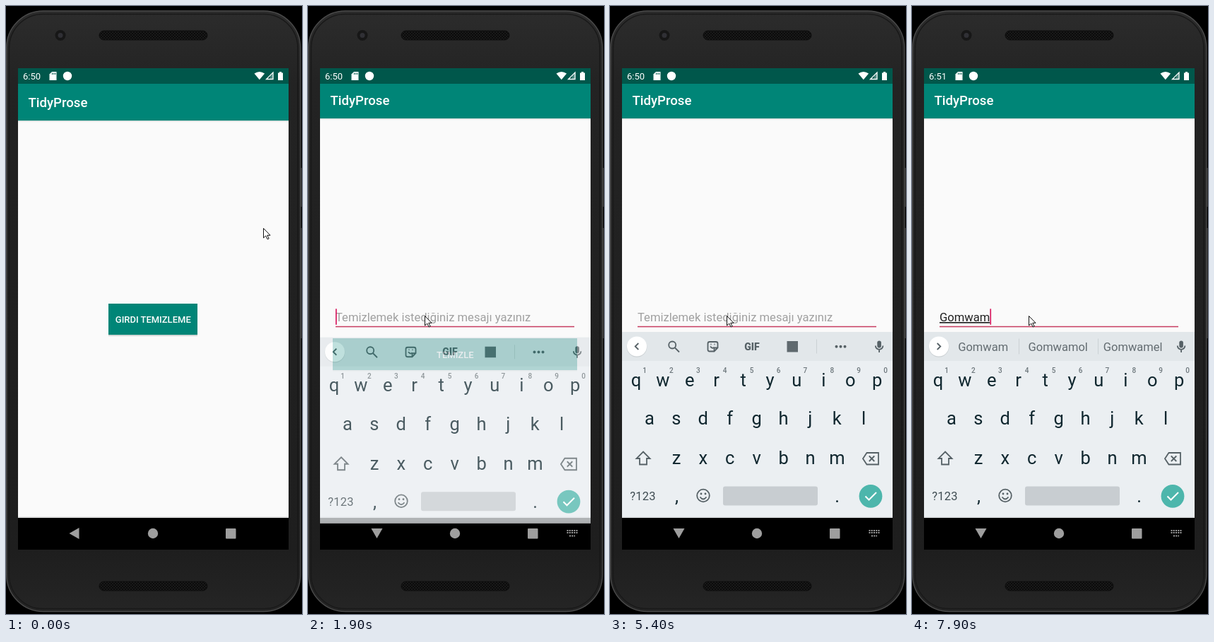
Animation of 419 by 860 pixels, one loop 8000 ms. Source, as an HTML page:

```html
<!DOCTYPE html>
<html lang="tr">
<head>
<meta charset="utf-8">
<title>Phone input demo</title>
<style>
  html, body { margin: 0; width: 100%; height: 100%; overflow: hidden; background: #000; }
  svg { display: block; width: 419px; height: 860px; font-family: Roboto, sans-serif; }
  .mid { text-anchor: middle; }
  .title { font-size: 18.6px; font-weight: 500; fill: #fff; }
  .button { font-size: 13px; font-weight: 500; fill: #fff; text-anchor: middle; }
  .input { font-size: 16.6px; }
  .key { font-size: 25.5px; fill: #10272f; }
  .digit { font-size: 10px; font-weight: 500; fill: #6d777c; }
  .word { font-size: 16.5px; fill: #636c71; }
  .line { fill: none; stroke: #566166; stroke-width: 1.8; }
</style>
</head>
<body>
<svg viewBox="0 0 419 860">
  <defs>
    <linearGradient id="body" x1="0" y1="0" x2="0" y2="1">
      <stop offset="0" stop-color="#2c2c2c"/>
      <stop offset=".12" stop-color="#232323"/>
      <stop offset=".9" stop-color="#1e1e1e"/>
      <stop offset="1" stop-color="#252525"/>
    </linearGradient>
    <pattern id="mesh" width="4" height="4" patternUnits="userSpaceOnUse">
      <rect width="4" height="4" fill="#191919"/>
      <circle cx="1" cy="1" r="1" fill="#060606"/>
      <circle cx="3" cy="3" r="1" fill="#060606"/>
    </pattern>
    <clipPath id="screen"><rect x="17" y="88" width="383" height="681"/></clipPath>
    <g id="bar">
      <rect x="17" y="108" width="383" height="54" fill="#008577"/>
      <rect x="17" y="162" width="383" height="1.5" fill="#dcdfde"/>
      <text class="title" x="31.5" y="143">TidyProse</text>
    </g>
    <g id="edges">
      <rect x="17" y="88" width="383" height="22" fill="#00574b"/>
      <rect x="17" y="722" width="383" height="2" fill="#e2e2e2"/>
      <rect x="17" y="724" width="383" height="45"/>
    </g>
  </defs>

  <!-- Phone -->
  <path d="M416 229h3v55h-3zM416 314h3v156h-3z" fill="#2b2b2b"/>
  <rect x=".8" y="7" width="416" height="849.5" rx="52" fill="url(#body)" stroke="#4b4b4b" stroke-width="1.4"/>
  <rect x="4.5" y="11.5" width="408.5" height="841" rx="48" fill="none" stroke="#191919" stroke-width="1.5"/>
  <circle cx="77" cy="41.5" r="7.5" fill="#171717"/>
  <circle cx="77" cy="41.5" r="3.5" fill="#303035"/>
  <rect x="132" y="35" width="153" height="13" rx="6.5" fill="url(#mesh)" stroke="#0e0e0e"/>
  <rect x="132" y="814" width="153" height="13" rx="6.5" fill="url(#mesh)" stroke="#0e0e0e"/>

  <g clip-path="url(#screen)">
    <rect x="17" y="88" width="383" height="681"/>
    <g id="home">
      <rect x="17" y="88" width="383" height="681" fill="#fafafa"/>
      <use href="#bar"/>
      <rect x="145" y="422" width="126" height="45" fill="#d3d7d6"/>
      <rect x="145" y="421" width="126" height="44" fill="#008577"/>
      <text class="button" x="208.3" y="447.7">GIRDI TEMIZLEME</text>
      <use href="#edges"/>
      <rect id="shade" x="17" y="88" width="383" height="681" opacity=".07"/>
    </g>

    <g id="form">
      <rect x="17" y="88" width="383" height="681" fill="#fafafa"/>
      <g id="pan">
        <use href="#bar"/>
        <text id="hint" class="input" x="39" y="449" fill="#a0a0a0">Temizlemek istediğiniz mesajı yazınız</text>
        <text id="typed" class="input" x="39" y="449" fill="#212121" text-decoration="underline"></text>
        <rect id="underline" x="39" width="338"/>
        <rect id="caret" y="431.3" width="1.7" height="22.5" fill="#d81b60"/>
        <rect x="35" y="474" width="346" height="45.5" fill="#d3d7d6"/>
        <rect x="35" y="473" width="346" height="45" fill="#008577"/>
        <text class="button" x="208.3" y="500.5">TEMIZLE</text>
      </g>
      <use href="#edges"/>
    </g>

    <g id="keyboard">
      <rect x="17" y="461" width="383" height="263" fill="#ebeff2"/>
      <rect x="17" y="461" width="383" height="41" fill="#e2e7ea"/>
      <rect x="17" y="722" width="383" height="2" fill="#dfe2e4"/>
      <circle cx="38" cy="482.5" r="14.3" fill="#cdd2d5"/>
      <circle cx="38" cy="481.5" r="14" fill="#fff"/>
      <path id="chevron" d="M2.3-4.5-2.3 0l4.6 4.5" class="line"/>
      <g id="tools">
        <circle cx="88.2" cy="479.5" r="5" class="line"/>
        <path d="M92 483.5l6 6" class="line" stroke-width="2"/>
        <path d="M141 475h9q2.500 0 2.500 2.500v6l-5 5h-6.500q-2.500 0-2.500-2.500v-8.500q0-2.500 2.500-2.500zM152 483.500h-4.500v5M142 481.500q3 4 5.500 1M142.500 478.500h1M147.500 478.500h1" class="line"/>
        <text class="mid" x="201" y="486.600" font-size="14" font-weight="900" fill="#566166">GIF</text>
        <rect x="250.500" y="474" width="15.500" height="15.500" fill="#5f696e"/>
        <path d="M292.500 471.500v20" stroke="#cbd1d4"/>
        <g fill="#566166">
          <circle cx="320.500" cy="481.700" r="2"/><circle cx="326.500" cy="481.700" r="2"/><circle cx="332.500" cy="481.700" r="2"/>
        </g>
      </g>
      <g id="words">
        <path d="M151.500 470.500v22M263.500 470.500v22" stroke="#cbd1d4"/>
        <text class="word mid" x="100.700" y="488"></text>
        <text class="word mid" x="206.700" y="488"></text>
        <text class="word mid" x="312.700" y="488"></text>
      </g>
      <rect x="378.300" y="473.500" width="5.600" height="10" rx="2.800" fill="#566166"/>
      <path d="M375.800 480.500a5.300 5.300 0 0 0 10.600 0M381.100 486v4" class="line" stroke-width="1.600"/>
      <g id="keys"></g>
      <path d="M47 630.500l9.500 9.500h-4.500v8.500h-10v-8.500h-4.500z" class="line"/>
      <path d="M363.500 632h16.500v16.500h-16.500l-5.500-8.250zM366.800 636.500l7.500 7.500M374.300 636.500l-7.500 7.500" class="line"/>
      <text class="mid" x="46.500" y="699" font-size="16.500" fill="#3f4c52" letter-spacing=".2">?123</text>
      <text class="key mid" x="94.500" y="702" font-size="22">,</text>
      <text class="key mid" x="321.500" y="702" font-size="22">.</text>
      <circle cx="132" cy="692.500" r="8.800" class="line"/>
      <path d="M127.500 694.500q4.500 6 9 0" class="line"/>
      <circle cx="129" cy="690" r="1.400" fill="#566166"/><circle cx="135" cy="690" r="1.400" fill="#566166"/>
      <rect x="160" y="679.500" width="134" height="27" rx="3" fill="#c8cdd1"/>
      <circle cx="369" cy="693.300" r="16.400" fill="#4db6ac"/>
      <path d="M361.500 693.500l5 5 10.500-10.500" fill="none" stroke="#fff" stroke-width="2"/>
    </g>

    <!-- Status and navigation icons -->
    <g fill="#fff">
      <text id="clock" x="24" y="104" font-size="13"></text>
      <path d="M65 93h6.500v12h-10v-8.500z"/>
      <path d="M65.500 94.500v2.500M67.700 94.500v2.500M69.800 94.500v2.500" stroke="#00574b"/>
      <circle cx="87" cy="99" r="6.200"/>
      <path d="M351.500 95.500q7.300-5.200 14.600 0l-7.300 8.800z"/>
      <path d="M368.500 103.500h9.500v-9.500z" fill="none" stroke="#fff" stroke-width="1.300"/>
      <path d="M374 98.500l4-4.500v9.500h-4z" opacity=".3"/>
      <path d="M385 94.500h2v-1.500h3v1.500h2v10.500h-7z"/>
    </g>
    <g fill="#9e9e9e">
      <path id="back"/>
      <circle cx="208" cy="746" r="7.200"/>
      <rect x="311" y="739" width="14.500" height="14.500" rx="1"/>
      <path id="switcher" d="M366.500 742h15M366.500 745h15M370 749.500h8" fill="none" stroke="#9e9e9e" stroke-width="2" stroke-dasharray="2 1.250"/>
    </g>
  </g>

  <path id="pointer" d="M.5.500v13.500l3.200-3 2.500 5 2-1-2.400-4.700h4.200z" fill="#fff" stroke="#111" stroke-width="1"/>
</svg>

<script>
const LOOP = 8000, STEP = 100;
const $ = id => document.getElementById(id);
const set = (id, attrs) => Object.entries(attrs).forEach(([name, value]) => $(id).setAttribute(name, value));
const show = (id, visible) => set(id, { opacity: +visible });
const progress = (t, from, to) => Math.min(1, Math.max(0, (t - from) / (to - from)));
const mix = (a, b, p) => a + (b - a) * p;

const BLINKS = [2300, 2900, 3400, 3900, 4400, 4800, 5400, 5900, 6400, 6900];
const STROKES = [6900, 7400, 7600, 7700, 7800, 7900];
const NAME = 'Gomwam';
const SUGGESTIONS = [
  ['', '', ''],
  ['G', 'Gel', 'Güzel'],
  ['Go', 'Gol', 'Gövde'],
  ['Gom', 'Gomalak', 'Gömlek'],
  ['Gomw', 'Gomwal', 'Gomwel'],
  ['Gomwa', 'Gomwamo', 'Gomwame'],
  ['Gomwam', 'Gomwamol', 'Gomwamel']
];

const rows = [['qwertyuiop', 37, 537.5], ['asdfghjkl', 56, 592], ['zxcvbnm', 94, 648]];
$('keys').innerHTML = rows.map(([letters, left, y], row) => [...letters].map((letter, i) => {
  const x = left + 37.9 * i;
  const digit = row ? '' : `<text class="digit mid" x="${x + 12}" y="519">${(i + 1) % 10}</text>`;
  return `<text class="key mid" x="${x}" y="${y}">${letter}</text>${digit}`;
}).join('')).join('');

const zoom = s => `translate(208.5 428.5) scale(${s}) translate(-208.5 -428.5)`;
const passed = (times, t) => times.filter(time => t >= time).length;

function drawWindows(t) {
  const opened = t >= 1000, settle = t >= 1500 ? 0 : Math.exp(-(t - 1000) / 120);
  set('home', { transform: zoom(opened ? 1.05 - 0.0125 * settle : 1) });
  show('form', opened);
  show('shade', false);
  if (opened) set('shade', { opacity: 0.07 });
  set('form', { transform: zoom(opened ? 1 - 0.034 * settle : 1) });
}

function drawInput(t) {
  const focused = t >= 1700;
  const count = passed(STROKES, t);
  set('pan', { transform: `translate(0 ${t >= 1800 ? -3 : 0})` });
  set('underline', focused
    ? { y: 455.8, height: 1.5, fill: '#c63c60' }
    : { y: 456, height: 1, fill: '#777' });
  show('hint', count === 0);
  $('typed').textContent = NAME.slice(0, count);
  set('caret', { x: 39 + (count ? $('typed').getComputedTextLength() : 0) });
  show('caret', focused && passed(BLINKS, t) % 2 === 0);

  const reveal = count ? progress(t, 6800, 7100) : 0;
  set('tools', { opacity: 1 - reveal });
  set('words', { opacity: reveal });
  set('chevron', { transform: `translate(38 481.5) scale(${count ? -1 : 1} 1)` });
  $('words').querySelectorAll('text').forEach((el, i) => el.textContent = SUGGESTIONS[count][i]);
}

function drawKeyboard(t) {
  const rise = progress(t, 1700, 2100);
  set('keyboard', {
    opacity: 1 - (1 - rise) ** 2,
    transform: `translate(0 ${31 * (1 - rise) ** 2})`
  });
  const open = t >= 1800;
  set('back', { d: open ? 'M89.500 739h16l-8 14z' : 'M103.500 738v16l-14-8z' });
  show('switcher', open);
}

function drawPointer(t) {
  const first = progress(t, 0, 400), second = progress(t, 1100, 1500);
  const x = mix(mix(364, 223, first), 165, second);
  const y = mix(mix(314, 449, first), 438, second);
  set('pointer', { transform: `translate(${x} ${y})` });
}

function frame() {
  const t = Math.floor(performance.now() % LOOP / STEP) * STEP;
  $('clock').textContent = t < 6100 ? '6:50' : '6:51';
  drawWindows(t);
  drawInput(t);
  drawKeyboard(t);
  drawPointer(t);
  requestAnimationFrame(frame);
}
frame();
</script>
</body>
</html>
```
